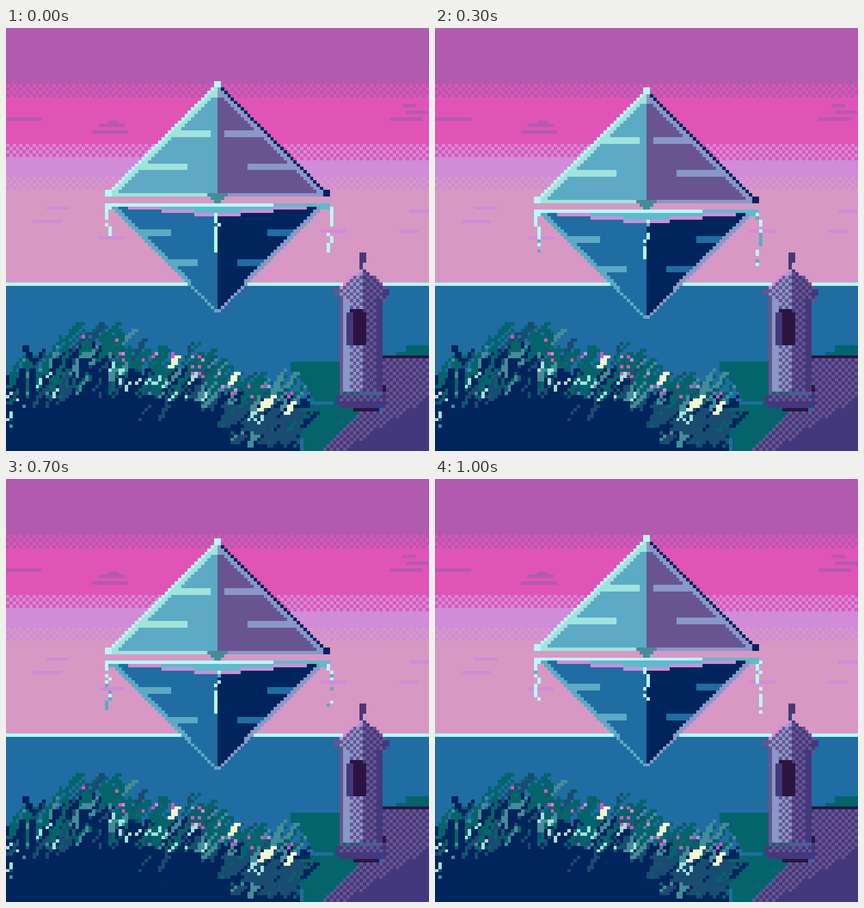
These frames come from a looping animation (748 px wide and 748 px high, 1.1 s). An HTML page with a canvas:

```html
<!DOCTYPE html>
<html>
<head>
<meta charset="utf-8">
<title>Floating crystal</title>
<style>
html, body { margin: 0; width: 100%; height: 100%; overflow: hidden; }
canvas { display: block; width: 748px; height: 748px; image-rendering: pixelated; }
</style>
</head>
<body>
<canvas id="view" width="128" height="128"></canvas>
<script>
const N = 128, STEPS = 11, STEP_MS = 100;
const C = {
  dusk: '#b25ab0', pink: '#e054b6', lilac: '#d08cd8', salmon: '#d898c4', foam: '#b8f8fc',
  sea: '#1f6da2', navy: '#00245c', teal: '#5caac4', cyan: '#5cbccc', mint: '#a0e4dc',
  haze: '#8898c8', plum: '#685490', indigo: '#44387c', dark: '#2c1440',
  leaf: '#04646c', steel: '#184c70', sage: '#448c98', cream: '#f0f8d0'
};
const stage = document.getElementById('view').getContext('2d');
const scene = document.createElement('canvas');
scene.width = scene.height = N;
let g = scene.getContext('2d');

function rect(x, y, w, h, color) {
  g.fillStyle = C[color];
  g.fillRect(Math.round(x), Math.round(y), Math.round(w), Math.round(h));
}
const dot = (x, y, color) => rect(x, y, 1, 1, color);

// Fills row y from a up to b.
const span = (y, a, b, color) => { if (b > a) rect(a, y, b - a, 1, color); };

function checker(x, y, w, h, color) {
  for (let j = y; j < y + h; j++)
    for (let i = x; i < x + w; i++) if ((i + j) % 2) dot(i, j, color);
}

let seed = 7;
function rnd() {
  seed = (seed * 16807) % 2147483647;
  return seed / 2147483647;
}
const pick = list => list[Math.floor(rnd() * list.length)];

function sky() {
  rect(0, 0, N, 21, 'dusk');
  checker(0, 17, N, 4, 'pink');
  rect(0, 21, N, 18, 'pink');
  checker(0, 35, N, 4, 'lilac');
  rect(0, 39, N, 10, 'lilac');
  rect(64, 39, 64, 1, 'pink');
  checker(64, 39, 64, 1, 'lilac');
  checker(0, 45, N, 4, 'salmon');
  rect(0, 49, N, 28, 'salmon');
  const clouds = (color, list) => list.forEach(([x, y, w]) => rect(x, y, w, 1, color));
  clouds('dusk', [[0, 27, 11], [31, 28, 3], [28, 29, 8], [26, 31, 11],
    [120, 23, 4], [121, 25, 7], [116, 27, 10]]);
  clouds('lilac', [[12, 54, 7], [8, 58, 9], [28, 63, 8], [122, 55, 6], [95, 61, 8], [119, 61, 6]]);
  rect(0, 77, N, 1, 'foam');
  rect(0, 78, N, 51, 'sea');
}

function shore() {
  for (let y = 101; y < N; y++)
    span(y, y < 104 ? 86 : y < 113 ? 88 + (y - 104) * .6 : 90, 108, 'leaf');
  rect(92, 113, 7, 1, 'sea');
  rect(121, 96, 7, 2, 'leaf');
  rect(118, 98, 10, 1, 'leaf');
}

function wall() {
  for (let y = 99; y < N; y++) {
    const left = y < 116 ? 114 : 223 - y;
    span(y, left, N, 'indigo');
    checker(left, y, Math.min(N, Math.round(306 - y * 1.6)) - left, 1, 'plum');
  }
  rect(114, 99, 14, 1, 'dark');
  rect(105, 115, 8, 1, 'dark');
  rect(113, 108, 2, 2, 'dark');
}

function tower() {
  rect(107, 68, 2, 3, 'indigo');
  rect(107, 71, 1, 3, 'indigo');
  for (let y = 73; y < 83; y++) {
    const half = y < 79 ? Math.round(1 + (y - 73) * 1.25) : y < 81 ? 8 : 7;
    span(y, 108 - half, 108 + half, 'plum');
    checker(109 - half, y, half, 1, 'haze');
    checker(108, y, half, 1, 'indigo');
    if (y < 79) dot(108 - half, y, 'lilac');
  }
  rect(99, 79, 1, 2, 'plum');
  rect(114, 79, 2, 2, 'indigo');
  rect(101, 82, 13, 28, 'plum');
  rect(102, 82, 2, 28, 'haze');
  checker(104, 82, 5, 28, 'haze');
  checker(108, 82, 5, 28, 'indigo');
  rect(112, 82, 2, 28, 'indigo');
  rect(104, 85, 4, 1, 'dark');
  rect(103, 86, 6, 10, 'dark');
  rect(103, 86, 2, 10, 'indigo');
  rect(100, 111, 15, 3, 'indigo');
  checker(101, 110, 13, 3, 'plum');
  rect(101, 114, 13, 1, 'indigo');
}

// Height of the meadow: a hump at the left that slopes down to the right.
const crest = x => x < 28 ? 100 - x * .4 + Math.sin(x / 4) * 2 : 92 + (x - 28) * .27 + Math.sin(x / 5) * 2;

function blade(x, y, length, lean, color, width = 1) {
  for (let i = 0; i < length; i++) rect(x + lean * i, y - i, width, 1, color);
}

function meadow() {
  for (let x = 0; x < 92; x++) {
    const y = crest(x) + 5 + rnd() * 3;
    rect(x, y, 1, x < 89 ? N - y : 8 - 2 * (x - 89), 'navy');
  }
  const mixes = [
    ['leaf', 'leaf', 'leaf', 'leaf', 'sage', 'steel'],
    ['leaf', 'leaf', 'leaf', 'sage', 'steel', 'navy', 'navy', 'sage', 'mint'],
    ['navy', 'navy', 'steel', 'steel', 'leaf', 'sage']
  ];
  for (let n = 0; n < 430; n++) {
    const x = rnd() * 88, depth = rnd();
    const color = pick(mixes[Math.floor(depth * 3)]);
    const length = color == 'mint' ? 2 : 3 + rnd() * 4;
    blade(x, crest(x) + 3 + depth * 18, length, .2 + rnd() * .8, color, rnd() < .4 ? 2 : 1);
  }
  for (let n = 0; n < 45; n++) {
    const x = 40 + rnd() * 46;
    blade(x, 116 + rnd() * (x < 66 ? 3 : 9), 3, .9, 'steel', 3);
  }
  for (let n = 0; n < 70; n++) blade(rnd() * 62, 117 + rnd() * 6, 4 + rnd() * 3, .6, 'navy', 2);
  rect(0, 121, 68, 7, 'navy');

  // Tall dark stalks in front.
  for (const x of [3, 6, 28, 36]) blade(x, 117, 15, .1, 'navy', 2);
  blade(7, 100, 5, -.6, 'navy', 2);
  blade(8, 101, 5, .8, 'navy');

  for (const [x, y] of [[49, 102], [67, 107], [76, 115], [78, 114], [84, 116]])
    blade(x, y, 4, .7, 'cream', 2);
  for (let n = 0; n < 12; n++) {
    const x = rnd() * 80;
    blade(x, crest(x) + 8 + rnd() * 12, 3, .6, 'mint');
  }
  for (let n = 0; n < 28; n++) {
    const x = 12 + rnd() * 80;
    dot(x, crest(x) + rnd() * 6, n % 3 ? 'pink' : 'lilac');
  }
  for (let n = 0; n < 4; n++) dot(57 + (n % 2) * 2 - 1, 103 + (n >> 1) * 2 - 1, 'pink');
}

function upperHalf() {
  for (let y = 18; y < 50; y++) {
    const l = 80 - y, r = 47 + y;
    const [a, b] = y < 21 ? [64, 64] : y >> 1 == 15.5 ? [l, r] : y == 31 || y == 32 ? [62, 66]
      : y == 41 || y == 42 ? [55, 73] : [l + 3, r - 2];
    span(y, l, a, 'mint');
    span(y, a, 64, 'teal');
    span(y, 64, b, 'plum');
    span(y, b, r, 'haze');
    dot(l, y, 'foam');
    dot(r, y, 'navy');
  }
  rect(63, 16, 2, 2, 'foam');
  span(50, 32, 64, 'mint');
  span(50, 64, 96, 'haze');
  rect(30, 49, 2, 2, 'foam');
  rect(96, 49, 2, 2, 'navy');
  for (let i = 0; i < 3; i++) span(50 + i, 61 + i, 67 - i, 'sage');
}

function lowerHalf() {
  for (let y = 54; y < 86; y++) {
    const l = y - 22, r = 149 - y, edge = y < 77 ? 2 : 1;
    const [a, b] = y == 61 || y == 62 ? [50, 79] : y == 70 || y == 71 ? [58, 70] : [l, r];
    span(y, l, 64, 'sea');
    span(y, 64, r, 'navy');
    span(y, l, a, 'teal');
    span(y, b, r, 'sea');
    span(y, l, l + edge, 'teal');
    span(y, r + 1 - edge, r + 1, 'haze');
  }
  // Pool on top.
  span(53, 30, 81, 'foam');
  span(53, 81, 98, 'cyan');
  for (let i = 0; i < 3; i++) span(54 + i, 37 + i * 10, 91 - i * 10, 'lilac');
  span(54, 47, 81, 'cyan');
  span(55, 57, 71, 'cyan');
  span(54, 30, 32, 'foam');
  span(54, 95, 98, 'cyan');
}

// A broken trickle that wanders around column x, new at every step.
function trickle(x, y, length, dim) {
  let shift = 0;
  for (let i = 0; i < length; i++) {
    if (rnd() < .25) shift = shift ? 0 : 1;
    if (i < 2 || rnd() < .8) dot(x + shift, y + i, rnd() < dim ? 'teal' : 'foam');
  }
}

function water(step) {
  seed = 1000 + step * 7919;
  const dim = .4 * Math.sin(Math.PI * step / STEPS) ** 2;
  const grow = 3 * Math.sin(Math.PI * step / STEPS);
  trickle(30, 54, 9 + grow + rnd() * 3, dim);
  trickle(63, 56, 9 + grow + rnd() * 3, dim / 2);
  trickle(97, 54, 12 + rnd() * 4, dim);
}

[sky, shore, wall, tower, meadow].forEach(draw => draw());
g = stage;

function frame() {
  const step = Math.floor(performance.now() / STEP_MS) % STEPS;
  const sink = Math.ceil(Math.min(step, STEPS - step) / 2);
  g.drawImage(scene, 0, 0);
  g.save();
  g.translate(0, sink);
  upperHalf();
  lowerHalf();
  water(step);
  g.restore();
  requestAnimationFrame(frame);
}
frame();
</script>
</body>
</html>
```
